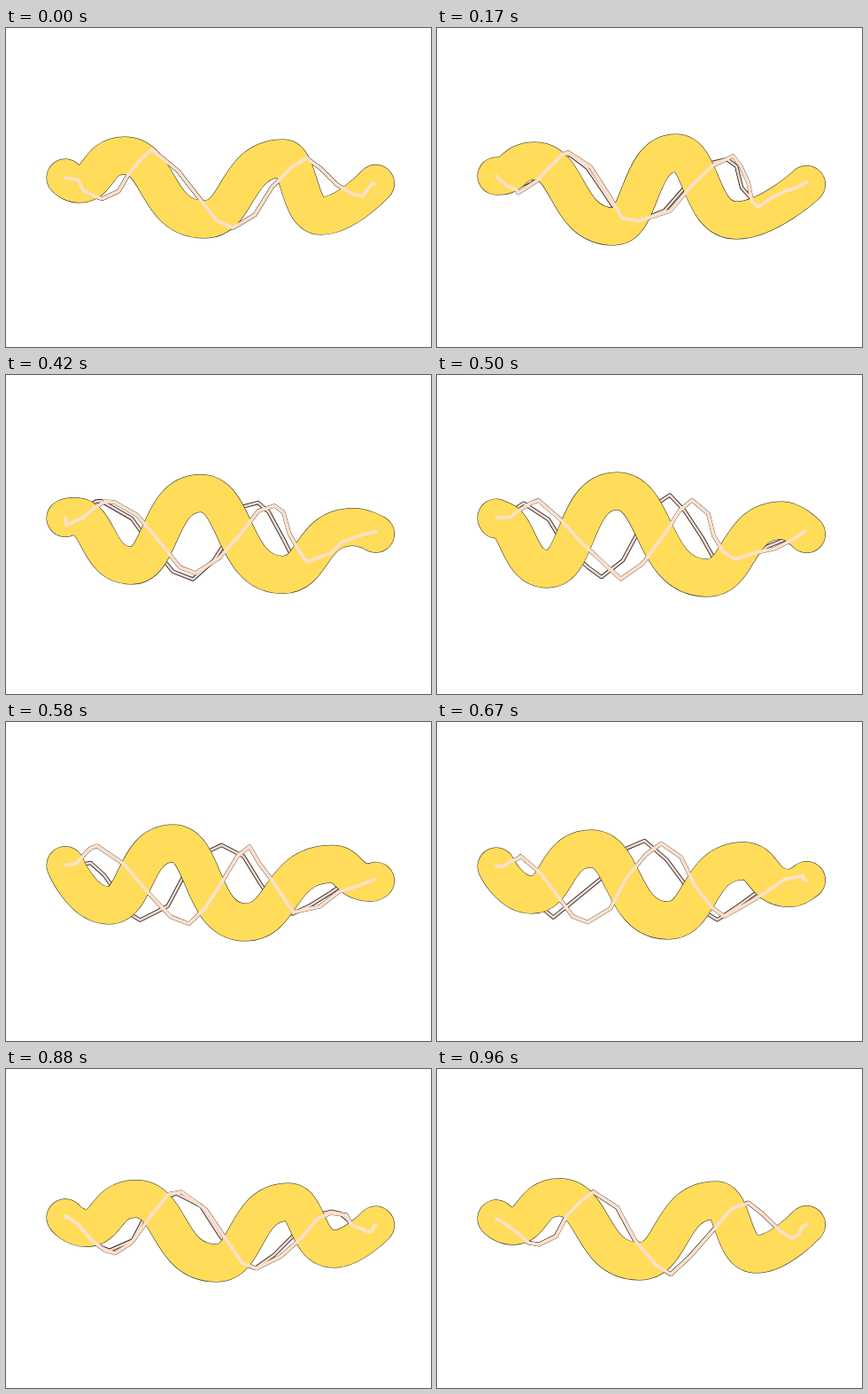
An HTML page for the animation above (1000 ms loop, 480 by 360 pixels).

```html
<!DOCTYPE html>
<html lang="en">
<head>
<meta charset="utf-8">
<title>Wriggling worm</title>
<style>
html, body { margin: 0; width: 100%; height: 100%; overflow: hidden; background: #fff; }
svg { display: block; width: 480px; height: 360px; }
path { fill: none; stroke-linecap: round; stroke-linejoin: round; }
.edge { stroke: #33291f; stroke-width: 4.4; }
.strand { stroke: #f2dad5; stroke-width: 2.6; }
.rim { stroke: #26221a; stroke-width: 43; }
.body { stroke: #ffdc5a; stroke-width: 42; }
.vein { stroke: #fde0cb; stroke-width: 3.8; }
</style>
</head>
<body>
<svg viewBox="0 0 480 360">
  <path class="edge line"/><path class="edge twin"/>
  <path class="strand line"/><path class="strand twin"/>
  <path class="rim worm"/><path class="body worm"/>
  <path class="vein line"/>
</svg>
<script>
const LOOP = 1000, TICKS = 24, HELD = 8; // the first 8 ticks are shown in pairs

// Route of one bend as [tick, x, y]: born at the tail, it drifts to the head over
// about three loops, so bends one loop apart are on stage together.
const WORM = {
  crest: [[7, 417, 179], [8, 395, 179], [12, 390, 164], [18, 325, 153], [24, 313, 147],
    [28, 270, 141], [36, 203, 131], [42, 160, 149], [48, 134, 144], [56, 87, 156], [60, 68, 163]],
  trough: [[13, 419, 178], [18, 385, 194], [24, 356, 212], [32, 320, 222], [36, 305, 229],
    [38, 270, 226], [48, 224, 216], [52, 200, 224], [56, 158, 211], [60, 125, 219],
    [66, 98, 183], [72, 83, 176], [76, 70, 167]]
};
const STRAND = {
  crest: [[15, 418, 178], [18, 398, 174], [24, 340, 150], [28, 335, 146], [36, 290, 144],
    [42, 235, 134], [48, 165, 140], [56, 134, 143], [62, 102, 142], [66, 90, 164], [69, 68, 166]],
  trough: [[19, 418, 180], [24, 400, 190], [28, 362, 200], [38, 327, 213], [42, 318, 222],
    [47, 262, 230], [52, 228, 220], [62, 207, 231], [66, 130, 222], [72, 110, 194], [82, 68, 170]]
};

const lerp = (a, b, t) => a + (b - a) * t;
const smooth = t => t * t * (3 - 2 * t);
const noise = seed => {
  const v = Math.sin(seed * 12.9898) * 43758.5453;
  return (v - Math.floor(v)) * 2 - 1;
};

// position on a route, or nothing before birth and after arrival
function along(route, tick) {
  const i = route.findIndex(k => k[0] >= tick);
  if (i < 1) return [];
  const [t0, x0, y0] = route[i - 1], [t1, x1, y1] = route[i];
  const t = (tick - t0) / (t1 - t0);
  return [[lerp(x0, x1, t), lerp(y0, y1, t)]];
}

// head, all bends on stage from left to right, tail
function nodes(shape, tick) {
  const sway = Math.cos(tick / TICKS * 2 * Math.PI);
  const list = [[67, 165 + 4 * sway]];
  for (let lap = 3; lap >= 0; lap--) {
    list.push(...along(shape.crest, tick + lap * TICKS));
    list.push(...along(shape.trough, tick + lap * TICKS));
  }
  list.push([417.5, 177.5 - 2 * sway]);
  return list;
}

function wormPath(tick) {
  const list = nodes(WORM, tick), last = list.length - 1;
  let d = `M${list[0]}`;
  for (let i = 1; i <= last; i++) {
    const [x0, y0] = list[i - 1], [x1, y1] = list[i], dx = x1 - x0;
    const leave = i === 1 ? 0 : 0.45, arrive = i === last ? 0 : 0.62;
    d += `C${x0 + dx * leave},${y0} ${x1 - dx * arrive},${y1} ${x1},${y1}`;
  }
  return d;
}

// jagged line: a few shaky corners on each slope
function strandPath(tick, seed) {
  const list = nodes(STRAND, tick);
  let d = `M${list[0]}`;
  for (let i = 1; i < list.length; i++) {
    const [x0, y0] = list[i - 1], [x1, y1] = list[i];
    const size = Math.min(3.5, Math.hypot(x1 - x0, y1 - y0) / 12);
    for (const t of [0.3, 0.55, 0.8, 1]) {
      const n = seed + i * 7 + t;
      d += `L${lerp(x0, x1, t) + size * noise(n)},${lerp(y0, y1, smooth(t)) + size * noise(n + 50)}`;
    }
  }
  return d;
}

const setPath = (sel, d) => document.querySelectorAll(sel).forEach(e => e.setAttribute('d', d));
let shown = -1;

function draw() {
  // starts fall on whole hundredths of a second
  const time = performance.now() % LOOP;
  let tick = TICKS - 1;
  while (tick > 0 && (Math.round(tick * LOOP / TICKS / 10) * 10 > time || tick < HELD && tick % 2)) tick--;
  if (tick !== shown) {
    shown = tick;
    const split = 3 * Math.sin(tick / TICKS * Math.PI) ** 2;
    setPath('.worm', wormPath(tick));
    setPath('.line', strandPath(tick, tick));
    setPath('.twin', strandPath(tick + split, tick + (split > 0.2 ? 100 : 0)));
  }
  requestAnimationFrame(draw);
}
draw();
</script>
</body>
</html>
```
